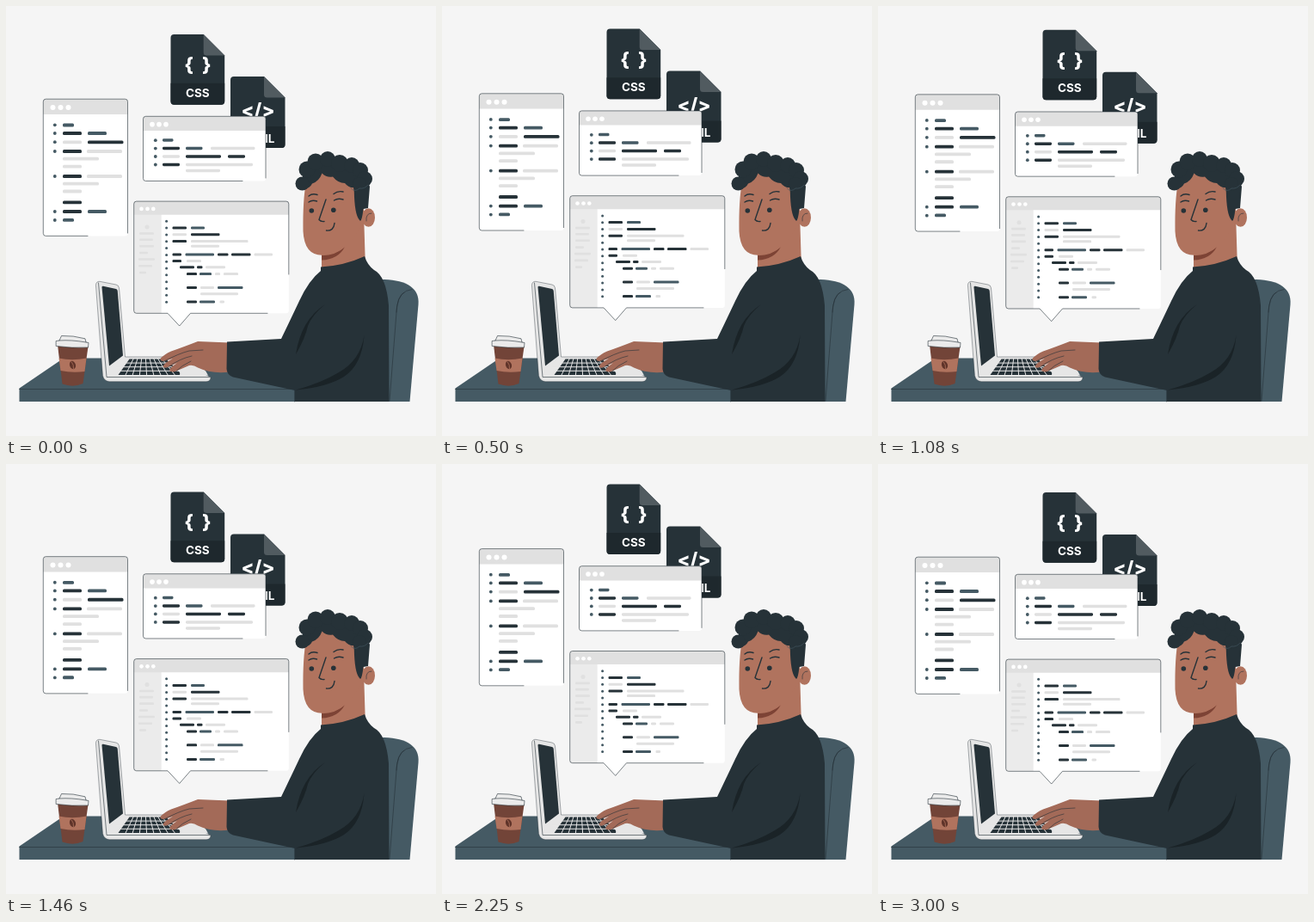
An HTML page that plays this animation: 500 px wide and 500 px high, repeating every 3.04 s.

```html
<!DOCTYPE html>
<html lang="en">
<head>
<meta charset="utf-8">
<title>Programmer at work</title>
<style>
  html, body { margin: 0; width: 100%; height: 100%; overflow: hidden; background: #f5f5f5; }
  svg { display: block; width: 100%; height: 100%; }
  text { font-family: Inter, Lato, sans-serif; font-weight: 700; font-size: 13.5px; fill: #fff; text-anchor: middle; }
  .sign { font-weight: 800; font-size: 22px; }
  .ink { fill: #263238; }
  .blue { fill: #455a64; }
  .pale { fill: #e0e0e0; }
  .skin { fill: #b0735e; }
  .hand { fill: #a36a58; }
  .line { fill: none; stroke: #263238; stroke-width: .6; stroke-linecap: round; stroke-linejoin: round; }
  .brow { stroke-width: 1.4; }
</style>
</head>
<body>
<svg viewBox="0 0 500 500">
  <g id="float"></g>

  <g id="chair">
    <path class="blue" d="M430 318H440C466 319 481 328 479.500 347L469.500 460H436Z"/>
    <path class="line" d="M446 459L454.500 350Q457 331 472 329.500M454 356Q455 337 463 333"/>
  </g>

  <g id="desk">
    <path class="blue" d="M15.500 444.500L67 409.500H345V460H15.500Z"/>
    <path class="line" d="M15.500 445.500H337M335.500 446V460"/>
  </g>

  <g id="cup">
    <path fill="#724438" d="M60 394L95.500 396L89.500 439Q78 444 65.500 439.500Z"/>
    <path fill="#b0735e" d="M61.500 409.500Q77 413 93.500 409.500L91.500 425Q77 427 63.500 424Z"/>
    <ellipse cx="77.500" cy="417.500" rx="3.400" ry="4.800" fill="#5f3329" transform="rotate(-20 77.500 417.500)"/>
    <path d="M76 413.500Q79 417 78.500 422" fill="none" stroke="#b0735e" stroke-width=".8"/>
    <path class="line" style="fill:#ebebeb" d="M58.500 389.500L62 389L64.500 383.500Q78 383 92 386.800L93 391L96 391.500L95.500 397Q76 398 58.500 395.500Z"/>
    <path class="line" d="M62 389Q76 388 93 391"/>
  </g>

  <g id="laptop">
    <path class="line" style="fill:#e6e6e6;stroke-width:.4" d="M104.500 324Q105 320 109 320.300L128 324Q131 324.500 131.500 328L138.500 408H189L238 431.500Q238 436.500 233 436.700H120Q114 436 112.500 430Z"/>
    <path class="ink" d="M111.500 327Q111.500 325.500 113 325.800L128 329Q129.500 329.500 129.700 331L136 406.500L120 418.500Z"/>
    <path class="line" d="M107.500 322L117 431.500H237"/>
    <path class="ink" d="M143.500 410.500H186L205 429H130.500Z"/>
    <path id="keys" fill="none" stroke="#e6e6e6" stroke-width="1"/>
    <path fill="#e6e6e6" d="M203 416H221Q231 420 235 429.500H202Z"/>
  </g>

  <g id="man">
    <path class="hand" d="M260 391.500L223 390Q205 397 192 401.500Q184 405 179.500 410Q179 413.500 184 413L194 410Q184 415 182.500 419Q184 422 189 419.500L199 415Q190 421 190 424Q193 426.500 198 424.500L213 418Q218 417 223 420.500Q239 428 260 425.500Z"/>
    <path class="line" d="M184 413Q201 404 213 401L229 400M189 419.500Q202 410 216 407M198 424.500Q204 418 215 413"/>

    <path class="skin" d="M367 270V306H418L416 240Z"/>
    <path fill="#7d4335" d="M367 290Q384 290 394 280Q386 295 367 295.500Z"/>
    <path class="ink" d="M366 303.500Q393 302 417 291Q420 301 428 307Q442 314 445 348L445.500 460H336V447L264 431.500Q257 429 256.500 422L257 390.500L320 387Q333 360 341 343Q352 319 366 308Z"/>
    <path fill="#1a2327" d="M371 347Q343 365 337 405Q348 386 351 372Q356 359 371 347Z"/>
    <path fill="#1a2327" d="M416.500 383Q412 412 387 426Q367 438 337 446.500Q374 443 393 431Q414 417 416.500 383Z"/>

    <ellipse class="skin" cx="421.500" cy="246" rx="7.500" ry="10.800"/>
    <path class="line" d="M419 250Q418 241 425 241"/>
    <path class="skin" d="M349 205Q345 225 345.500 262Q347 292 371 289.500Q394 287 407 265L417 250L412 190H362Z"/>
    <path class="ink" d="M345 213Q353 213 356 206.500Q364 204 367.500 194.500Q373 200 380 198.500Q386 206 394 206Q399 212 404 211Q405 215 405 222Q406 245 412 250Q414 249 415.500 236L421 235L423 210L415 190L386 176L362 178L345 192Z"/>
    <g id="curls" class="ink"></g>
    <path class="line" style="stroke:#455a64" d="M401 212Q406 217 411 212Q417 213 421 208"/>
    <circle class="ink" cx="355.300" cy="238" r="2.800"/>
    <circle class="ink" cx="380.800" cy="237.200" r="2.800"/>
    <path class="line brow" d="M352 221Q356 217.500 362 219.500M352 228Q356 225 361.500 227M381 218.500Q386 214.500 392 216M381.500 226Q386 223 392 225M372 225L364 248.500Q366 251 370 250.500M372.500 261Q381 262 382 252.500"/>
  </g>
</svg>
<script>
const $ = id => document.getElementById(id);
const tones = { k: 'ink', b: 'blue', l: 'pale' };

const bar = (tone, x1, x2, y, h) =>
  `<rect class="${tones[tone]}" x="${x1}" y="${y - h / 2}" width="${x2 - x1}" height="${h}" rx="${h / 2.5}"/>`;

const dot = (x, y, r, attr) => `<circle cx="${x}" cy="${y}" r="${r}" ${attr}/>`;

// Each row reads "y tone+start-end ..."
const bars = (rows, h) => rows.map(row => {
  const [y, ...parts] = row.split(' ');
  return parts.map(p => bar(p[0], ...p.slice(1).split('-'), +y, h)).join('');
}).join('');

const bullets = (x, ys, r) => ys.map(y => dot(x, y, r, 'class="blue"')).join('');

// The outline stays open at the lower right: from endX on the bottom round to endY on the right
function card(x, y, r, b, head, lights, size, endX, endY, tail = '', inside = '') {
  const top = `V${y + 3}Q${x} ${y} ${x + 3} ${y}H${r - 3}Q${r} ${y} ${r} ${y + 3}`;
  const bottom = `${tail}H${x + 3}Q${x} ${b} ${x} ${b - 3}`;
  return `<path d="M${r - 3} ${b}${bottom}${top}V${b - 3}Q${r} ${b} ${r - 3} ${b}Z" fill="#fff"/>${inside}
    <path class="pale" d="M${x} ${head}${top}V${head}Z"/>
    <path class="line" d="M${endX} ${b}${bottom}${top}V${endY}"/>` +
    lights.map(cx => dot(cx, (y + head) / 2 + 1, size, 'fill="#fff"')).join('');
}

function file(x, y, w, h, label, baseline, sign) {
  const r = x + w, b = y + h, mid = x + w / 2;
  return `<path class="ink" d="M${x + 4} ${y}H${r - 24.5}L${r} ${y + 24.5}V${b - 4}Q${r} ${b} ${r - 4} ${b}H${x + 4}Q${x} ${b} ${x} ${b - 4}V${y + 4}Q${x} ${y} ${x + 4} ${y}Z"/>
    <path fill="#1e282d" d="M${x} ${b - 25}H${r}V${b - 4}Q${r} ${b} ${r - 4} ${b}H${x + 4}Q${x} ${b} ${x} ${b - 4}Z"/>
    <path fill="#515b60" d="M${r - 24.5} ${y}L${r} ${y + 24.5}H${r - 21}Q${r - 24.5} ${y + 24.5} ${r - 24.5} ${y + 21}Z"/>
    ${sign}<text x="${mid}" y="${baseline}">${label}</text>`;
}

const side = bars(['264.5 l155-172', '271.7 l155-171', '279.2 l155-172', '287 l155-165', '294.5 l154-173', '302.3 l154-170', '310 l155-163'], 2.6);

$('float').innerHTML =
  file(191.5, 33, 62.7, 81.7, 'CSS', 105.6,
    '<text class="sign" x="212.700" y="76">{</text><text class="sign" x="233.300" y="76">}</text>') +
  file(261, 82, 63.5, 83, 'HTML', 158.5, '<text class="sign" x="293" y="129">&lt;/&gt;</text>') +

  card(43.3, 108.2, 141.5, 267.4, 126, [54.5, 63.5, 72.5], 3, 95, 264) +
  bullets(56.8, [138.3, 148, 158.2, 169, 198, 239, 249], 1.9) +
  bars(['138.5 b66-79', '148 k66-88 b95-117', '158.3 l66-88 k95-136.5', '169 k66-88 l94-135',
    '177.7 l66-108', '186.6 l66-88', '198 k66-88 l94-135', '206.7 l66-108', '215.5 l66-88',
    '228.4 k66-88', '239 k66-88 b95-117', '248.8 b66-79'], 3.8) +

  card(159.5, 128.3, 302, 203.5, 145, [170, 178, 186], 2.8, 275, 200) +
  bullets(173.8, [156.2, 165.6, 175, 184.5], 1.9) +
  bars(['156 b182-194.5', '165.5 k182-202 b209-228.5 l238-289.5', '175 l182-202 k209-250 k258-278',
    '184.5 k182-202 l209-287', '191.5 l209-249'], 3.5) +

  card(148.7, 227.1, 328.8, 357.3, 242.7, [157.5, 164.5, 171.3], 2.3, 304, 312, 'H214.500L201.700 372L188 357.300',
    `<path fill="#ebebeb" d="M148.700 242H180.700V357.300H151.700Q148.700 357.300 148.700 354.300Z"/>`) +
  side + dot(164, 257, 2.5, 'class="pale"') +
  bullets(186.6, Array.from({ length: 13 }, (_, i) => 250.3 + i * 7.82), 1.5) +
  bars(['258 k193.5-210 b215-231', '265.8 l193.5-210 k215-248.5', '273.6 k193.5-210 l215-281.5', '279.2 l215-248',
    '289 k193.5-204 b208.5-242 k246-258.5 k262-284.5 l288.5-310', '296.6 k193.5-204 l210-227',
    '303.8 k202-219 k222-228.5 l232-255', '311.6 k210-222 b225-239 l243-249 l253-270',
    '327.4 k210-222 l226-242 b246-275.5', '334.8 l226-270', '344 k210-222 b225-243 l248.5-254'], 3);

// Keyboard gaps: straight rows crossed by fanned columns
let gaps = '';
for (let i = 1; i < 4; i++) gaps += `M128 ${410.5 + i * 4.6}H206`;
for (let i = 1; i < 9; i++) gaps += `M${143.5 + i * 4.72} 410L${130.5 + i * 8.28} 429.5`;
$('keys').setAttribute('d', gaps);

$('curls').innerHTML = [[344.5, 206.5, 8], [350, 190, 9.5], [360, 181, 9.5], [374, 178, 9], [388, 183, 10],
  [402, 185, 9], [412, 191, 9], [417, 201, 9], [411, 207, 8]].map(c => dot(...c, '')).join('');

// The cards bob up and down every 1.5 s, drawn at 24 steps per second
function draw() {
  const step = Math.floor((performance.now() % 3040 + 5) * .024) % 36;
  const y = -9.6 * (1 - Math.abs(1 - step / 18));
  $('float').setAttribute('transform', `translate(0 ${y})`);
  requestAnimationFrame(draw);
}
draw();
</script>
</body>
</html>
```
